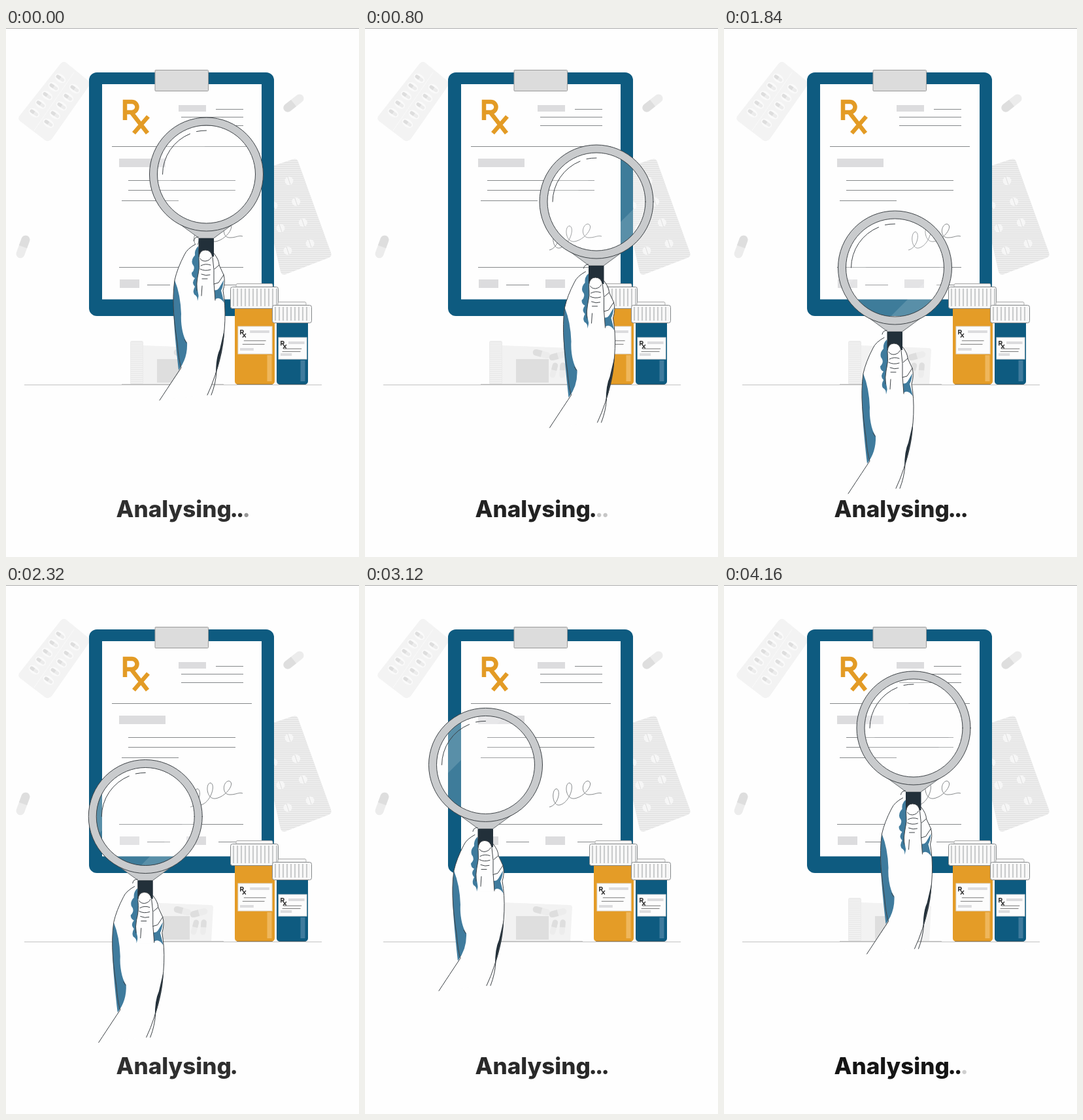
An HTML page that plays this animation: 540x810 px, repeating every 4.24 s.

```html
<!DOCTYPE html>
<html lang="en">
<head>
<meta charset="utf-8">
<title>Analysing</title>
<style>
html, body { margin: 0; width: 100%; height: 100%; overflow: hidden; background: #fefefe; }
svg { display: block; width: 540px; height: 810px; }
text { font: 800 35px Inter, "Open Sans", sans-serif; }
.line { fill: none; stroke: #85888a; stroke-width: 1; }
.ink { fill: none; stroke: #3d4246; stroke-width: 1; stroke-linecap: round; stroke-linejoin: round; }
</style>
</head>
<body>
<svg viewBox="0 0 540 810">
  <defs>
    <path id="rx" d="M3.500 31V3H14a8 8 0 0 1 0 16H4M13 19L38 51M39 25.500L17 51" fill="none" stroke-width="6.500"/>
    <g id="capsule">
      <rect x="-18" y="-6.500" width="36" height="13" rx="6.500" fill="#ececec"/>
      <path d="M0-6.500H-11.500a6.500 6.500 0 0 0 0 13H0z" fill="#dedede"/>
    </g>
    <pattern id="weave" width="3" height="3" patternUnits="userSpaceOnUse">
      <path d="M0 .5H3" stroke="#f1f1f1"/>
    </pattern>
  </defs>

  <path d="M0 .5H540" stroke="#aaa"/>

  <g id="back">
    <path d="M84 54q4-4 8-1l33 27q5 5 1 10L70 170q-5 5-10 2L22 143q-5-4-1-9z" fill="#f3f3f3"/>
    <path d="M104 68L43 157" stroke="#fafafa"/>
    <path d="M385 219L439 201q6-2 8 4L497 344q2 6-4 8L428 377q-6 2-8-4z" fill="#e5e5e5"/>
    <path d="M385 219L439 201q6-2 8 4L497 344q2 6-4 8L428 377q-6 2-8-4z" fill="url(#weave)"/>
    <use href="#capsule" transform="translate(440 115) rotate(-38)"/>
    <use href="#capsule" transform="translate(26 335) rotate(110)"/>
    <path d="M209 486L313 490q4 0 4 4L314 546H209z" fill="#f2f2f2"/>
    <rect x="190" y="479" width="20" height="67" rx="3" fill="#ebebeb"/>
    <rect x="231" y="507" width="50" height="36" fill="#dedede"/>
    <path d="M177 545.500H333" stroke="#c6c6c6"/>
    <path d="M28 546.500H483" stroke="#c3c3c3"/>
  </g>

  <g id="board">
    <rect x="127" y="68" width="283" height="373" rx="12" fill="#0e5b80"/>
    <rect x="147" y="86" width="244" height="329.500" fill="#fefefe"/>
    <rect x="228" y="64.500" width="81.500" height="32" rx="1" fill="#dcdcdc" stroke="#999"/>
    <use href="#rx" transform="translate(178.500 110)" stroke="#e39b25"/>
    <path fill="#dcdcde" d="M264 118h42v10h-42zM173 200h71v13h-71zM174 385h30v13h-30zM276 385h30v13h-30z"/>
    <path class="line" d="M321 124.500h42M268 136.500h95M268 149.500h95M162 181.500h214M187 233.500h164M187 248.500h164M177 264.500h87M173 366.500h190M216 393.500h35M325 393.500h37"/>
    <path class="line" d="M282 340C296 337 300 314 293 312C285 313 286 338 297 337C312 335 322 306 313 303C305 303 306 328 320 327C336 325 352 303 341 300C331 301 330 322 343 321C352 321 356 317 362 319"/>
  </g>

  <g id="bottles"></g>

  <g id="tool">
    <g transform="translate(306.500 224)">
      <circle r="75" fill="#fff" opacity=".2"/>
      <path d="M74.700-6.700A75 75 0 0 1-6.700 74.700zM25.500-70.500A75 75 0 0 0-70.500 25.500z" fill="#fff" opacity=".14"/>
      <path d="M-41 76L-11 98H11L41 76A87 87 0 0 1-41 76z" fill="#c9cbcd" stroke="#666b6e"/>
      <circle r="81" fill="none" stroke="#c9cbcd" stroke-width="12"/>
      <circle r="87" class="ink"/>
      <circle r="75" class="ink"/>
      <path class="ink" d="M-67 0A67 67 0 0 1-25-62M-15-65.500A67 67 0 0 1 0-67"/>
    </g>
    <path d="M290 331Q277 338 273 347Q262 368 258 386C253 420 258 455 262 482Q264 508 268 522L235 570L308 562Q322 530 328 500C336 465 337 430 332 404Q336 388 333 378Q328 366 325 360L317 344z" fill="#fefefe"/>
    <path d="M258 386C253 420 258 470 264 524Q278 506 277 482C270 472 267 452 268 438Q267 408 258 386z" fill="#3f7b9d"/>
    <path d="M294 334Q288 340 289 348Q283 354 285 361Q291 368 284 375Q284 381 289 383Q283 390 289 396Q285 403 288 408Q293 410 293 418Q297 405 293 390L298 350z" fill="#3f7b9d"/>
    <path d="M333 386Q332 397 329 402L334 421Q325 408 318 418L315 400Q322 404 326 398z" fill="#3f7b9d"/>
    <path d="M334 462Q334 490 321 530Q321 505 327 492z" fill="#22303a"/>
    <path d="M294.500 322H318V350H294.500z" fill="#22303a"/>
    <path d="M295 352Q296 340 305 340Q314 340 316 351Q319 370 318 390L320 418L297 418Q290 395 293 382Q297 368 295 352z" fill="#fefefe"/>
    <path class="ink" d="M290 331Q277 338 273 347Q262 368 258 386C253 420 258 455 262 482Q264 508 268 520Q260 532 235 570M318 345Q326 355 326 363L333 378Q336 389 332 402C337 430 336 465 328 500Q322 532 308 562M322 526Q321 544 314 562M273 477L276 482"/>
    <path class="ink" d="M292 402Q291 392 293 382Q297 368 295 352Q296 340 305 340Q314 340 316 351Q319 370 318 390L320 417M297 353Q299 357 305 357Q312 356 314 351M298 364Q305 360 313 363M297 369Q304 373 313 370M299 377Q306 380 312 378M300 384L308 384M300 395L299 410M326 363L319 369M333 378L325 390L318 392"/>
    <path class="ink" d="M287 326Q288 320 294 320"/>
  </g>

  <text id="label" y="749"><tspan x="168.500">Analysing</tspan><tspan x="342.500">.</tspan><tspan x="352">.</tspan><tspan x="361.500">.</tspan></text>
</svg>
<script>
const LOOP = 4240, STEP = 80;
const $ = s => document.querySelector(s);
const add = (parent, markup) => $(parent).insertAdjacentHTML('beforeend', markup);
const pill = (x, y, angle, size) =>
  `<use href="#capsule" transform="translate(${x} ${y}) rotate(${angle}) scale(${size})"/>`;

// Blister packs and loose capsules behind the board
for (let i = 0; i < 10; i++) {
  const col = i % 2, row = i >> 1;
  const x = 83 + 22 * col - 10 * row, y = 77 + 16 * col + 13.2 * row;
  add('#back', `<ellipse cx="${x}" cy="${y}" rx="9" ry="6" transform="rotate(35 ${x} ${y})" fill="#fafafa"/>` + pill(x, y, 35, .4));
}
for (let i = 0; i < 7; i++) {
  const x = i < 4 ? 433 + 10.7 * i : 409 + 11 * (i - 4);
  const y = i < 4 ? 234 + 32 * i : 272 + 34.5 * (i - 4);
  add('#back', `<circle cx="${x}" cy="${y}" r="6.5" fill="#f6f6f6"/><path d="M${x - 2} ${y - 6}l4 12" stroke="#dedede"/>`);
}
add('#back', pill(270, 499, 15, .75) + pill(295, 502, -15, .75) + pill(289, 524, 105, .65) + pill(302, 524, 95, .65));
for (let y = 482.5; y < 545; y += 3) add('#back', `<path d="M191 ${y}h18" stroke="#f4f4f4"/>`);

function bottle(x, top, w, capH, color, light, label) {
  const bx = x + 7, bw = w - 13, by = top + capH, [lx, ly, lw, lh] = label;
  let ribs = '';
  for (let i = x + 5; i < x + w - 2; i += 6) ribs += `M${i} ${top + 3}v${capH - 6}`;
  add('#bottles', `
    <rect x="${bx}" y="${by - 4}" width="${bw}" height="${550 - by}" rx="5" fill="${color}"/>
    <path d="M${bx + bw - 8} ${ly + lh + 2}V541" stroke="${light}" stroke-width="7"/>
    <path d="M${bx + 3} 545.5h${bw - 6}" stroke="#555" opacity=".5"/>
    <rect x="${x + 9}" y="${top - 4.5}" width="${w - 18}" height="6" rx="2" fill="#f6f6f6" stroke="#aaa"/>
    <rect x="${x + .5}" y="${top + .5}" width="${w - 1}" height="${capH}" rx="3" fill="#f8f8f8" stroke="#85888a"/>
    <path d="${ribs}" stroke="#999c9e"/>
    <rect x="${lx}" y="${ly}" width="${lw}" height="${lh}" fill="#fcfcfc" stroke="#ddd"/>
    <use href="#rx" transform="translate(${lx + 3} ${ly + 5}) scale(.23)" stroke="#333"/>
    <path d="M${lx + lw * .35} ${ly + 8}h${lw * .57}M${lx + 3} ${ly + lh - 7}h${lw * .4}" stroke="#dcdcde" stroke-width="4"/>
    <path d="M${lx + lw * .17} ${ly + lh * .52}h${lw * .65}M${lx + lw * .13} ${ly + lh * .65}h${lw * .65}" stroke="#777"/>`);
}
bottle(343, 396, 74, 33, '#e49c27', '#efb75c', [355, 457, 52, 42]);
bottle(407, 424, 61, 27, '#0e5b80', '#3f7b9d', [417, 474, 43, 33]);

// Lens centre: time, x, y
const route = [
  [0, 306.5, 224], [800, 354, 266], [1200, 314, 321], [1840, 261.5, 367],
  [2800, 184.5, 319.5], [3520, 184.5, 228], [4160, 290, 219]
];
// Text grey level
const tone = [[0, 47], [800, 34], [1200, 60], [1840, 34], [2800, 60], [3520, 17], [4160, 21], [LOOP, 47]];
// Opacity of the second and third dot
const dot2 = [[0, 1], [560, 1], [800, .25], [960, 0], [1100, 0], [1200, .6], [1300, 1], [2000, 1],
  [2240, 0], [2560, 0], [2800, .92], [3240, 1], [3440, 0], [3520, .1], [3760, 1], [LOOP, 1]];
const dot3 = [[0, .5], [160, 1], [560, 1], [800, .25], [960, 0], [1360, 0], [1600, 1], [2000, 1],
  [2240, 0], [2800, 0], [3040, 1], [3240, 1], [3440, 0], [4080, 0], [4160, .2], [LOOP, .5]];

function linear(keys, t) {
  const i = keys.findIndex(k => k[0] > t), [t0, a] = keys[i - 1], [t1, b] = keys[i];
  return a + (b - a) * (t - t0) / (t1 - t0);
}

// Closed cubic curve whose tangents are limited so it never overshoots
const n = route.length;
const key = (i, c) => route[(i + n) % n][c] + (c ? 0 : Math.floor(i / n) * LOOP);
const span = i => key(i + 1, 0) - key(i, 0);
const slope = (i, c) => (key(i + 1, c) - key(i, c)) / span(i);
function tangent(i, c) {
  const a = slope(i - 1, c), b = slope(i, c), h = span(i - 1), k = span(i);
  if (a * b <= 0) return 0;
  const m = Math.abs(a * k + b * h) / (h + k);
  return Math.sign(a) * Math.min(m, 3 * Math.abs(a), 3 * Math.abs(b));
}
function glide(t, c) {
  let i = n - 1;
  while (key(i, 0) > t) i--;
  const h = span(i), u = (t - key(i, 0)) / h, v = 1 - u;
  return key(i, c) * v * v * (1 + 2 * u) + key(i + 1, c) * u * u * (3 - 2 * u)
    + h * u * v * (tangent(i, c) * v - tangent(i + 1, c) * u);
}

const tool = $('#tool'), label = $('#label'), parts = label.children;
function draw(now) {
  const t = Math.floor(now % LOOP / STEP) * STEP;
  tool.setAttribute('transform', `translate(${glide(t, 1) - 306.5} ${glide(t, 2) - 224})`);
  const g = Math.round(linear(tone, t));
  label.setAttribute('fill', `rgb(${g},${g},${g})`);
  parts[2].setAttribute('fill-opacity', linear(dot2, t));
  parts[3].setAttribute('fill-opacity', linear(dot3, t));
}
const start = performance.now();
function tick() {
  draw(performance.now() - start);
  requestAnimationFrame(tick);
}
tick();
</script>
</body>
</html>
```
